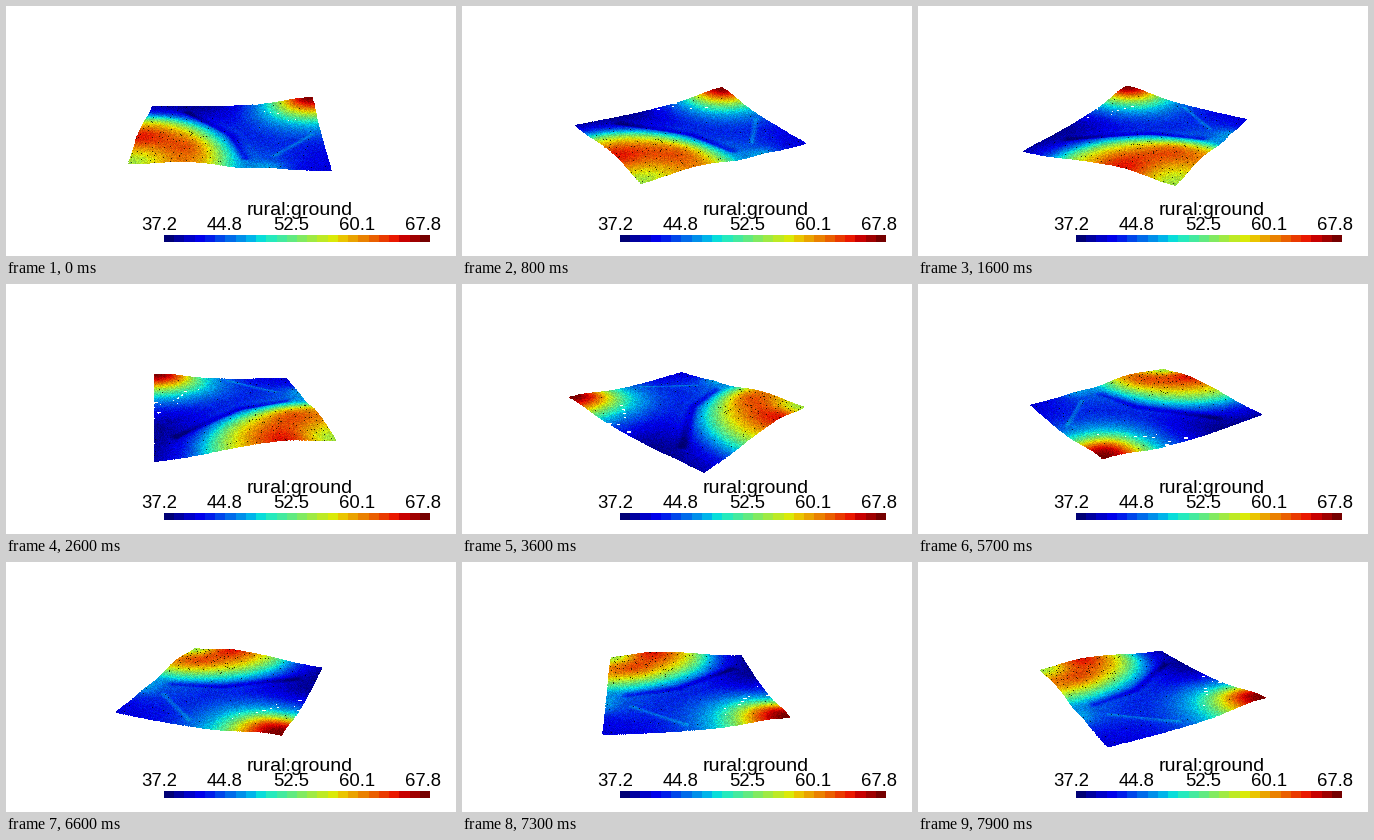
Write a matplotlib script that moves like this. It is 450 px wide and 250 px high and loops after 8 s.

```python
import numpy as np
import matplotlib.pyplot as plt
from matplotlib.animation import FuncAnimation

W, H = 450, 250
FRAMES, INTERVAL = 80, 100
STEP = np.radians(360 / 95)          # turn per frame
FOCAL = 466.5                        # camera distance, one unit is one pixel
SIN_E, COS_E = 0.4, 0.9165           # camera elevation
LOW, HIGH = 37.2, 67.8
GRID = 340
JET = plt.get_cmap("jet")
rng = np.random.default_rng(4)


def bump(u, v, cu, cv, r):
    return np.exp(-((u - cu) ** 2 + (v - cv) ** 2) / r ** 2)


def ridge(u, v, a, b, width):
    """Soft line from a to b."""
    (au, av), (bu, bv) = a, b
    du, dv = bu - au, bv - av
    t = np.clip(((u - au) * du + (v - av) * dv) / (du * du + dv * dv), 0, 1)
    return bump(u, v, au + t * du, av + t * dv, width)


def elevation(u, v):
    h = 38.1 + 0.9 * (1 - v) - 0.8 * bump(u, v, -0.3, 0.9, 0.6)
    # peak with a wide shoulder in the back right corner
    q = ((1 - u) ** 2.4 + (0.78 * (1 - v)) ** 2.4) ** (1 / 2.4)
    h += 20 * np.exp(-(q / 0.42) ** 2.2) + 9.5 * np.exp(-(q / 0.95) ** 3)
    # broad hill in the front left corner
    rho = np.hypot(u + 1, (v + 1) / 1.5)
    h += 22.5 / (1 + np.exp((rho - 0.93) / 0.135))
    h += 3.5 * bump(u, v, -1, -0.4, 0.3) + 2 * bump(u, v, -0.45, -0.65, 0.28)
    h -= 8 * bump(u, v, -1, -1, 0.38)
    # valley details: knoll, track and gully
    h += 4 * bump(u, v, 0.38, -1.05, 0.2) + 2.5 * bump(u, v, 0.4, -0.75, 0.45)
    h += 2.2 * ridge(u, v, (0.45, -0.7), (0.9, -0.1), 0.03)
    gully = np.maximum(ridge(u, v, (0.15, -0.75), (0, -0.1), 0.06),
                       ridge(u, v, (0, -0.1), (-0.55, 0.75), 0.06))
    return np.clip(h - 3 * gully, LOW, HIGH)


def polar(deg, r):
    a = np.radians(deg)
    return np.array([r * np.cos(a), r * np.sin(a)])


def make_cloud():
    axis = np.linspace(-1, 1, GRID)
    u, v = (g.ravel() for g in np.meshgrid(axis, axis))
    u = u + rng.uniform(-0.004, 0.004, u.size)
    v = v + rng.uniform(-0.004, 0.004, v.size)

    # gaps in the scan, strewn along a line
    keep = np.ones(u.size, bool)
    for t in np.linspace(0, 1, 13):
        cu = 0.15 + 0.55 * t + rng.normal(0, 0.05)
        cv = 0.93 - 0.62 * t + rng.normal(0, 0.05)
        r = rng.uniform(0.012, 0.032)
        keep &= np.hypot(u - cu, v - cv) > r
    u, v = u[keep], v[keep]

    h = elevation(np.clip(u, -1, 1), np.clip(v, -1, 1))
    noisy = h + rng.normal(0, 0.4, h.size)
    rgb = JET((noisy - LOW) / (HIGH - LOW))[:, :3]
    rgb *= rng.uniform(0.78, 1, h.size)[:, None]

    # dark specks, mostly on the hill
    hill = (h > 55) & (u + v < 0.4)
    specks = rng.random(h.size) < np.where(hill, 0.0025, 0.0004)
    rgb[specks] *= 0.25

    back_right, back_left = polar(39, 119), polar(140, 117.5)
    front_left, front_right = polar(221.8, 116), polar(317, 116)
    s, t = (u[:, None] + 1) / 2, (v[:, None] + 1) / 2
    xy = (1 - t) * ((1 - s) * front_left + s * front_right) \
        + t * ((1 - s) * back_left + s * back_right)
    return xy[:, 0], xy[:, 1], (h - 45) * 0.38, rgb, specks


X, Y, Z, RGB, SPECKS = make_cloud()


def render(angle):
    c, s = np.cos(angle), np.sin(angle)
    x, y = c * X - s * Y, s * X + c * Y
    depth = y * COS_E - Z * SIN_E
    scale = 1 / (1 + depth / FOCAL)
    col = np.floor(W / 2 + x * scale).astype(int)
    row = np.floor(H / 2 - (y * SIN_E + Z * COS_E) * scale).astype(int)
    order = np.argsort(-(depth - 3 * SPECKS))
    img = np.ones((H, W, 3))
    img[row[order], col[order]] = RGB[order]
    return img


fig = plt.figure(figsize=(W / 100, H / 100), dpi=100, facecolor="white")
ax = fig.add_axes([0, 0, 1, 1])
ax.axis("off")
view = ax.imshow(render(0), extent=(0, W, H, 0), interpolation="nearest",
                 aspect="auto")

# scalar bar
bands = JET(np.linspace(0, 1, 26))[None, :, :3] * 0.92
ax.imshow(bands, extent=(158, 424, 236, 229), interpolation="nearest",
          aspect="auto", zorder=2)


def label(x, y, text, px):
    ax.text(x, y, text, fontsize=px * 0.72, family="Liberation Sans",
            color="black", ha="center", va="baseline", zorder=3)


label(293.5, 209, "rural:ground", 19.5)
for i, value in enumerate(np.linspace(LOW, HIGH, 5)):
    label(153 + 66 * i, 224, f"{value - 0.01:.1f}", 18.5)
ax.set_xlim(0, W)
ax.set_ylim(H, 0)


def update(i):
    view.set_data(render(i * STEP))
    return [view]


anim = FuncAnimation(fig, update, frames=FRAMES, interval=INTERVAL,
                     repeat=True, repeat_delay=0)
plt.show()
```
